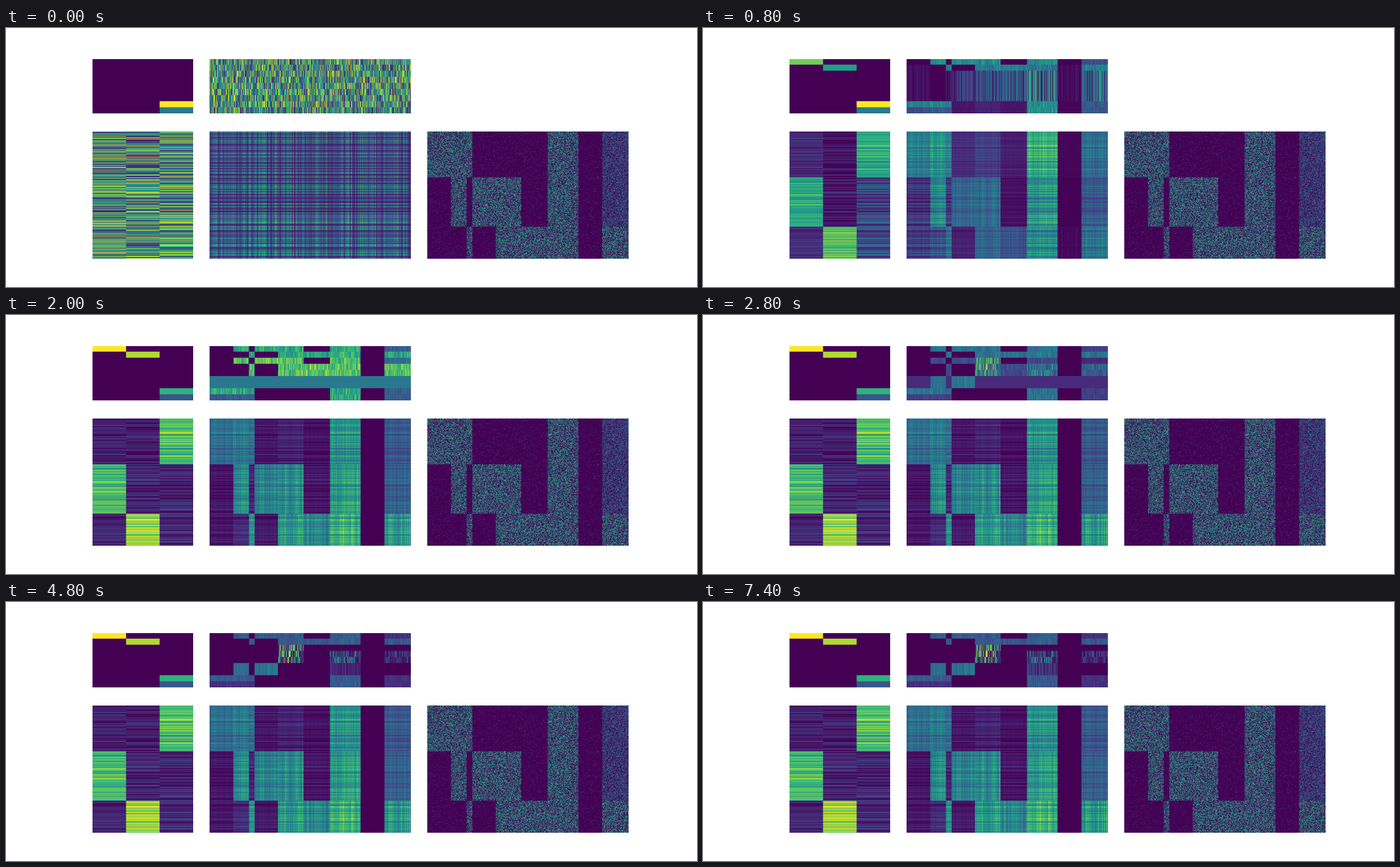
These frames come from a looping animation (1222 px wide and 458 px high, 8.8 s). A matplotlib script:

```python
import numpy as np
import matplotlib.pyplot as plt
from matplotlib.animation import FuncAnimation

# Three-factor matrix model, left @ core.T @ top, converging to block data.
W, H = 1222, 458
FRAMES, STEP = 44, 200
KEYS = [0, 2, 6, 10, 19, 30]

# Data on a grid finer than the stage, smoothed when drawn.
COLS = [0, 55, 91, 104, 158, 217, 278, 349, 404, 465]
ROWS = [0, 106, 220, 294]
N, M = ROWS[-1], COLS[-1]
CELL_H, CELL_W = 14, 78

# Strength of each column block for the three kinds of data row.
KINDS = np.array([[1, 1, 1, 0, 0, 0, 1, 0, .5],
                  [0, 1, 0, 1, 1, 0, 1, 0, .5],
                  [0, 0, 1, 0, 1, 1, 1, 0, 1]])
K0, K1, K2 = KINDS
COMMON = KINDS.min(0)
ROW_KIND = [1, 2, 1, 2, 2, 1, 1, 0, 0]
LEFT_KIND = [1, 2, 0]

rng = np.random.default_rng(7)
top_u, left_u = rng.random((9, M)), rng.random((N, 3))


def wobble(shape):
    return 1 + .18 * np.clip(rng.normal(size=shape), -2, 2)


top_w, left_w = wobble((9, M)), wobble((N, 3))


def spread(blocks):
    return np.repeat(blocks, np.diff(COLS), axis=-1)


def spikes(u, share):
    """Keep the highest share of the noise and let the rest be zero."""
    return np.clip(1 - (1 - u) / share, 0, 1)


def stripes(row, height, share=.75):
    return spread(np.clip(height, 0, 1)) * spikes(top_u[row], share)


def top_stages():
    shape = KINDS[ROW_KIND]
    shape[8] = (K0 + COMMON) / 2
    profile = spread(shape) * top_w

    mixed = (.06 + .5 * spread(KINDS.mean(0))) * top_w
    mixed[0] = .5 * profile[0]
    mixed[1:7] = stripes(1, .4 * (1 - K1) + .55 * K2 * (COMMON < 1))

    parted = .48 * profile
    rest = np.maximum(K1, K2) - K0 + 2 * COMMON
    parted[2:7] = stripes(2, rest / 2, .9)

    branched = .6 * profile
    branched[2:5] *= 1.2
    branched[5:7] = .4

    settled = .28 * profile
    overlap = np.minimum(K1, K2)
    for row, pull in zip((2, 3, 4), (1, .4, .4)):
        settled[row] = stripes(row, overlap - pull * COMMON)
    settled[5:7] = .38 * spread(np.clip(K1 - K2, 0, 1)) * top_w[5]

    final = settled.copy()
    final[5:7] += stripes(5, .28 * (COMMON == 1), 1.1)
    return [top_u, mixed, parted, branched, settled, final]


def left_stages():
    home = np.eye(3)[:, LEFT_KIND].repeat(np.diff(ROWS), axis=0)
    own = np.array([.65, .86, .69]) * left_w
    leak = .24 * spikes(left_u, .8)

    mixed = .45 * left_u ** .4
    mixed[:, 1] = np.clip(2 * (left_u - .65 + .2 * home)[:, 1], 0, 1)
    parted = np.where(home, own, leak * [.6, .4, 1.7])
    settled = np.where(home, own, leak)
    return [left_u, mixed, parted, settled, settled, settled]


def core_at(n):
    core = np.zeros((9, 3))
    core[0, 0] = np.interp(n, KEYS[:4], [0, .35, 1.22, 1.54])
    core[1, 1] = np.interp(n, KEYS[:4], [0, .12, 1.01, 1.35])
    core[7:, 2] = 1, .41
    return core / core.max()


def make_data():
    kind = spread(KINDS).repeat(np.diff(ROWS), axis=0)
    hit = rng.random((N, M)) < np.where(kind > 0, .48, .05)
    level = np.where(kind > 0, .15 + .4 * kind, .25)
    return hit * level * (.7 + .6 * rng.random((N, M)))


tops, lefts = top_stages(), left_stages()


def state(n):
    i = min(np.searchsorted(KEYS, n, side="right") - 1, len(KEYS) - 2)
    s = min((n - KEYS[i]) / (KEYS[i + 1] - KEYS[i]), 1)
    s = 1 - (1 - s) ** 2
    top, left = ((1 - s) * k[i] + s * k[i + 1] for k in (tops, lefts))
    core = core_at(n)
    product = left @ core.T @ top
    return (core.repeat(CELL_H, 0).repeat(CELL_W, 1), top.repeat(CELL_H, 0),
            left.repeat(CELL_W, 1), product / product.max())


fig = plt.figure(figsize=(W / 100, H / 100), dpi=100, facecolor="white")
grid = fig.add_gridspec(2, 3, width_ratios=[1, 2, 2], height_ratios=[3, 7],
                        left=.125, right=.9, top=.88, bottom=.11,
                        wspace=.1, hspace=.2)


def panel(row, col, data):
    ax = fig.add_subplot(grid[row, col])
    ax.axis("off")
    return ax.imshow(data, cmap="viridis", vmin=0, vmax=1, aspect="auto",
                     interpolation="hanning", interpolation_stage="rgba")


places = [(0, 0), (0, 1), (1, 0), (1, 1)]
images = [panel(r, c, d) for (r, c), d in zip(places, state(0))]
panel(1, 2, make_data())


def update(n):
    for image, data in zip(images, state(n)):
        image.set_data(data)
    return images


anim = FuncAnimation(fig, update, frames=FRAMES, interval=STEP, repeat=True)
plt.show()
```
